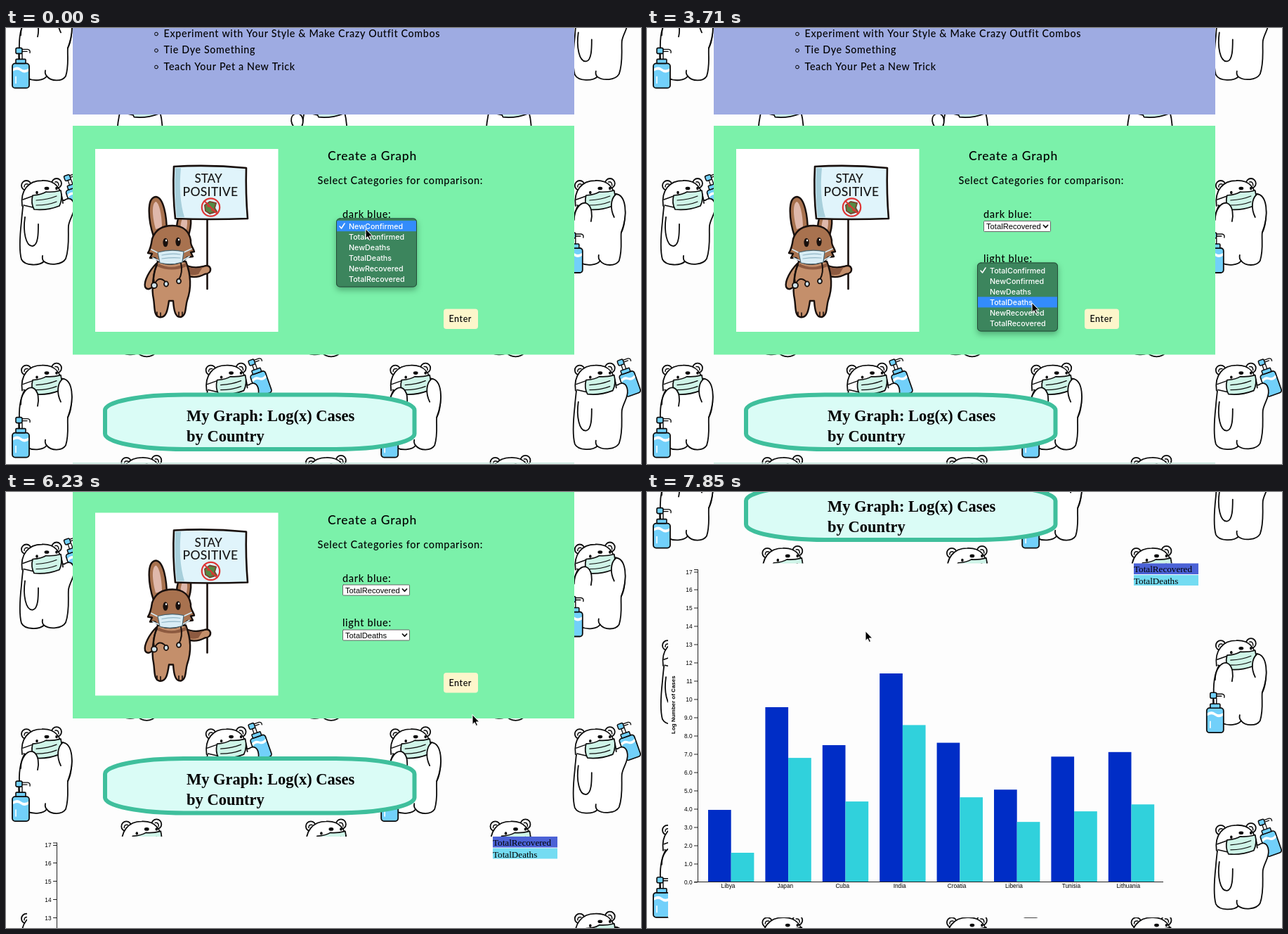
These frames come from a looping animation (904 by 620 pixels, 8 s). An HTML page with a canvas:

```html
<!DOCTYPE html>
<html lang="en">
<head>
<meta charset="utf-8">
<title>Create a Graph</title>
<style>
html, body { margin: 0; width: 100%; height: 100%; overflow: hidden; background: #fdfdfd; }
canvas { display: block; }
</style>
</head>
<body>
<canvas id="stage" width="904" height="620"></canvas>
<script>
const ctx = document.getElementById('stage').getContext('2d');
const LOOP = 8000, BEAT = 148;
const INK = '#0b0b0b', PAPER = '#fdfdfd';
const ROUND = 'Lato, sans-serif', ARIAL = '"Liberation Sans", Arial, sans-serif';

// Keys are in beats; values hold or run straight between them.
const CURSOR = [[0, 512, 286], [3, 516, 297], [5, 516, 297], [9, 536, 355], [11, 537, 356], [13, 533, 345],
  [17, 533, 345], [20, 560, 387], [21, 560, 387], [23, 548, 394], [24, 548, 394], [25, 548, 391],
  [29, 556, 393], [30, 556, 393], [34, 650, 415], [35, 650, 415], [39, 664, 317], [43, 664, 317],
  [45, 667, 306], [51, 667, 306], [52, 500, 252], [53, 311, 198]];
const SCROLL = [[40, 0], [41, 60], [42, 142.5], [43, 200], [44, 235], [45, 255.5], [46, 330],
  [47, 420], [48, 490], [49, 531]];

const OPTIONS = ['NewConfirmed', 'TotalConfirmed', 'NewDeaths', 'TotalDeaths', 'NewRecovered', 'TotalRecovered'];
const OPTIONS2 = ['TotalConfirmed', 'NewConfirmed', ...OPTIONS.slice(2)];
const BARS = [['Libya', 3.95, 1.6], ['Japan', 9.58, 6.8], ['Cuba', 7.5, 4.41], ['India', 11.43, 8.6],
  ['Croatia', 7.63, 4.64], ['Liberia', 5.06, 3.29], ['Tunisia', 6.87, 3.87], ['Lithuania', 7.12, 4.25]];

function track(keys, beat) {
  if (beat <= keys[0][0]) return keys[0].slice(1);
  for (let i = 1; i < keys.length; i++) {
    const a = keys[i - 1], b = keys[i];
    if (beat <= b[0]) {
      const u = (beat - a[0]) / (b[0] - a[0]);
      return a.slice(1).map((v, j) => v + (b[j + 1] - v) * u);
    }
  }
  return keys[keys.length - 1].slice(1);
}

function at(x, y, draw, angle = 0, scale = 1) {
  ctx.save();
  ctx.translate(x, y);
  ctx.rotate(angle);
  ctx.scale(scale, scale);
  draw();
  ctx.restore();
}

function rect(x, y, w, h, fill) {
  ctx.fillStyle = fill;
  ctx.fillRect(x, y, w, h);
}

function paint(shape, fill, stroke = INK, width = 1.8) {
  const p = typeof shape === 'string' ? new Path2D(shape) : shape;
  if (fill) { ctx.fillStyle = fill; ctx.fill(p); }
  if (stroke) { ctx.strokeStyle = stroke; ctx.lineWidth = width; ctx.stroke(p); }
}

function oval(x, y, rx, ry, fill, stroke = INK, width = 1.8) {
  const p = new Path2D();
  p.ellipse(x, y, rx, ry, 0, 0, Math.PI * 2);
  paint(p, fill, stroke, width);
}

function box(x, y, w, h, r, fill, stroke = null, width = 1) {
  const p = new Path2D();
  p.roundRect(x, y, w, h, r);
  paint(p, fill, stroke, width);
}

function text(str, x, y, font, color = '#000', align = 'left', spacing = 0) {
  ctx.font = font;
  ctx.letterSpacing = spacing + 'px';
  ctx.textAlign = align;
  ctx.fillStyle = color;
  ctx.fillText(str, x, y);
}

const label = (str, x, y, size) => text(str, x, y, `500 ${size}px ${ROUND}`, '#000', 'left', size * 0.045);

// ---- bears ----
function bottle() {
  box(-12, -16, 24, 35, 4, '#72d0fa', INK, 1.8);
  paint('M-11 -9Q-5 -13 0 -9T11 -9V-5Q5 -1 0 -5T-11 -5Z', '#fff', null);
  paint('M-7 3V12', null, '#fff', 1.6);
  box(-7, -22, 14, 6, 1, '#72d0fa', INK, 1.6);
  paint('M-3 -22V-30M2 -22V-30', null, INK, 1.4);
  box(-7, -38, 9, 8, 2, '#72d0fa', INK, 1.6);
  paint('M2 -36H10Q14 -35 13 -31M2 -33H9', null, INK, 1.4);
}

function bearHead() {
  oval(11, 11, 7, 7, '#fff');
  oval(54, 8, 7, 7, '#fff');
  paint('M8 13Q8 8 13 9M52 6Q57 5 57 11', null, INK, 1.5);
  paint('M5 40C2 18 14 4 33 4C52 3 61 14 63 36Z', '#fff', null);
  paint('M5 40C2 18 14 4 33 4C52 3 61 14 63 36', null);
  oval(26, 21, 1.8, 2.2, INK, null);
  oval(54, 15, 1.8, 2.2, INK, null);
  oval(40, 15, 3.4, 2.3, INK, null);
  paint('M20 26L6 31M20 42L7 39', null, INK, 1.5);
  paint('M20 25Q33 24 39 20Q48 21 60 18Q63 30 58 40Q40 47 22 45Q17 36 20 25Z', '#cff4e8', INK, 1.7);
  paint('M25 32Q42 31 54 26M25 39Q42 39 54 34', null, INK, 1.2);
}

function raisedBear() {
  at(82, 29, bottle, -0.34, 0.93);
  paint('M8 30C5 45 5 50 4 62C2 80 0 102 4 116C9 126 30 125 36 119C44 125 62 124 67 115' +
    'C73 98 70 80 71 68C73 57 80 50 79 40C78 30 72 27 65 32Z', '#fff');
  bearHead();
  paint('M9 56C6 76 10 98 20 97C28 96 28 78 28 66M36 119Q33 116 34 111', null);
}

function shyBear() {
  paint('M12 34C6 42 0 55 1 80C0 100 4 116 12 121C22 126 36 124 40 118C46 126 62 126 67 118' +
    'C72 102 69 88 70 78C77 66 80 28 63 23Z', '#fff');
  bearHead();
  paint('M3 60C3 45 12 34 20 36C29 40 29 54 27 62Z', '#fff', null);
  paint('M3 60C3 45 12 34 20 36C29 40 29 54 27 62', null);
  paint('M56 43C54 32 60 22 66 24C78 30 77 48 73 66C66 64 58 56 56 43Z', '#fff', null);
  paint('M62 23C77 24 80 52 70 78M62 24C55 30 54 44 60 56', null);
  paint('M40 118Q37 115 38 110', null);
  at(3, 116, bottle);
}

function plainBear(odd) {
  paint('M14 34C8 55 6 92 12 114C20 122 34 121 38 117C44 125 58 125 64 117C74 92 76 60 70 38Z', '#fff');
  at(11, 0, bearHead);
  if (odd) paint('M6 66C-8 58 -10 42 2 40C10 40 14 50 8 60', '#fff');
}

function wallpaper(scroll) {
  const size = 262.6;
  for (let j = -2; j < 5; j++) {
    const y = 213 + size * j;
    if (y + 290 < scroll || y - 30 > scroll + 620) continue;
    for (let k = -1; k < 4; k++) {
      const x = 18 + size * k;
      at(x, y, (k + j) % 2 ? shyBear : raisedBear);
      at(x + size / 2, y + size / 2, () => plainBear(k % 2));
    }
  }
}

// ---- picture ----
function bunny() {
  const fur = '#a8724f', belly = '#c48f6b', dark = '#8d5a40', pink = '#dfb8ab', line = '#19100d';
  rect(127, 172, 260.5, 260, '#fff');
  paint('M286.5 272V371', null, line, 2.6);
  paint('M210 296C203 275 199 241 213.5 240C224 241 229 266 229 292Z', fur, line, 2.4);
  paint('M213 286C208 268 207 249 213.5 247C219 250 222 270 222 284Z', pink, null);
  paint('M243 294C242 280 245 262 254 256C265 258 266 280 258 300Z', fur, line, 2.4);
  paint('M248 291C248 280 250 268 255 266C260 272 258 284 255 293Z', pink, null);

  paint('M214 335C204 345 196 360 198 368C201 374 208 371 213 362Z', belly, line, 2.4);
  paint('M254 336Q266 343 281 339Q289 336 291 342Q292 349 283 350Q270 357 256 352Z', belly, line, 2.4);
  paint('M258 339Q268 344 280 340L274 350Q264 353 258 349Z', dark, null);
  paint('M216 332C209 350 207 372 210 385C212 396 210 409 218 411C228 413 230 402 232 388H238' +
    'C239 402 241 412 249 411C257 409 255 397 258 387C264 370 263 350 256 332Z', belly, line, 2.4);
  paint('M217 335Q236 345 256 334L257 339Q236 348 215 339Z', dark, null);
  paint('M215 410V404M220 411V405M246 410V404M251 410V404', null, line, 1.6);
  paint('M215 337Q208 350 211 363M249 334Q252 348 246 358M212 363Q218 352 227 361', null, line, 2);
  oval(211, 366, 4, 4, '#cfe2ea', line, 1.8);
  oval(228, 364, 3, 3.6, '#cfe2ea', line, 1.8);
  oval(246, 360, 3, 3.4, '#cfe2ea', line, 1.8);

  paint('M208 300C213 285 225 281 237 281C253 281 261 290 263 302C262 309 267 313 268 318L263 319L266 325' +
    'L258 326C248 338 222 339 212 327L205 327L208 321L202 320C206 314 207 307 208 300Z', fur, line, 2.4);
  oval(227, 305, 3.6, 6.3, line, null);
  oval(245, 304, 3.6, 6.3, line, null);
  oval(228, 302, 1.1, 1.6, '#fff', null);
  oval(246, 301, 1.1, 1.6, '#fff', null);
  paint('M217 320L207 315M218 331L209 327M253 319L264 314M251 331L261 325', null, '#d5e9f2', 1.8);
  paint('M216 319Q235 314 253 318L251 333Q235 338 219 334Z', '#d9edf5', '#49636d', 1.2);
  paint('M222 323Q236 320 248 322M222 328Q236 326 248 327', null, '#92b6c6', 1.2);

  paint('M239 197Q290 194 342 199Q341 235 344 271Q290 273 241 271Q237 235 239 197Z', '#e0f4fb', line, 2.6);
  paint('M241 199H249Q245 240 254 269H243Q239 235 241 199Z', '#a7cfdb', null);
  text('STAY', 288, 220, `500 17px ${ROUND}`, '#171717', 'center');
  text('POSITIVE', 291, 238.5, `500 17.5px ${ROUND}`, '#171717', 'center', 0.3);
  paint('M283 252L290 247L299 249L297 256L300 261L290 264L284 260Z', '#548b45', '#77482d', 2);
  oval(288, 253, 2, 2, '#b34d35', null);
  oval(294, 259, 2, 2, '#b34d35', null);
  oval(291.5, 255, 12.7, 12.7, null, '#df3434', 2.2);
  paint('M282.5 246L300.5 264', null, '#df3434', 2);
}

// ---- form ----
function select(x, y, value) {
  box(x + 0.5, y + 0.5, 95, 15, 1, '#fff', '#666');
  text(value, x + 4, y + 12, `11.2px ${ARIAL}`);
  paint(`M${x + 85.5} ${y + 6.5}l3 3.2l3 -3.2`, null, '#111', 1.8);
}

function menu(x, y, items, hover, alpha) {
  const row = 15.1, top = y + 3.5;
  ctx.save();
  ctx.globalAlpha = alpha;
  ctx.shadowColor = 'rgba(0,40,20,.35)';
  ctx.shadowBlur = 9;
  ctx.shadowOffsetY = 4;
  box(x, y, 115, 98, 5, '#3c855d');
  ctx.shadowColor = 'transparent';
  rect(x + 0.5, top + hover * row, 114, row, '#338cfb');
  box(x + 0.5, y + 0.5, 114, 97, 5, null, '#254c38');
  items.forEach((s, i) => text(s, x + 18, top + 11.5 + i * row, '500 10.7px Inter, sans-serif', '#fff'));
  paint(`M${x + 5} ${top + 8}l2.5 3l4.5 -7`, null, '#fff', 1.5);
  ctx.restore();
}

function page(beat) {
  rect(95, -10, 714, 133, '#9eabe2');
  ['Experiment with Your Style & Make Crazy Outfit Combos', 'Tie Dye Something', 'Teach Your Pet a New Trick']
    .forEach((s, i) => {
      const y = 12.5 + i * 23.5;
      oval(214, y - 4, 2.4, 2.4, null, '#000', 1);
      label(s, 224.5, y, 14.3);
    });

  rect(95, 139, 714, 325.5, '#7bf1aa');
  bunny();
  label('Create a Graph', 458, 188, 17.5);
  label('Select Categories for comparison:', 443.5, 222, 14.5);
  label('dark blue:', 479, 270, 14.5);
  label('light blue:', 479, 333, 14.5);
  select(479, 274, beat < 14 ? 'NewConfirmed' : 'TotalRecovered');
  select(479, 338, beat < 28 ? 'TotalConfirmed' : 'TotalDeaths');
  box(623, 399.5, 49, 28.5, 4, '#fdf6cb');
  label('Enter', 630.5, 418, 12.5);

  const pill = new Path2D();
  pill.roundRect(141, 521.5, 440.5, 77.5, { x: 112, y: 22 });
  paint(pill, '#dafcf6', '#3fbf9c', 6);
  const title = 'bold 22.5px "Liberation Serif", Times, serif';
  text('My Graph: Log(x) Cases', 257, 558.5, title);
  text('by Country', 257, 587.5, title);
}

// ---- chart ----
function chart() {
  const base = 1085.5, unit = 25.94, font = `8.3px ${ARIAL}`;
  rect(30, 632.5, 765, 503.5, PAPER);
  BARS.forEach(([name, dark, light], i) => {
    const x = 87 + i * 81.4;
    rect(x, base - dark * unit, 32.7, dark * unit, '#002dc6');
    rect(x + 32.7, base - light * unit, 32.7, light * unit, '#30d1dc');
    text(name, x + 28.5, base + 8.5, font, '#000', 'center');
  });
  for (let v = 0; v <= 17; v++) {
    const y = base - v * unit;
    rect(67, Math.round(y) - 0.5, 5, 1, '#222');
    text(v < 10 ? v.toFixed(1) : String(v), 64.5, y + 3, font, '#000', 'right');
  }
  rect(67, 641, 5.5, 1, '#222');
  rect(72, 641, 1, base - 641, '#222');
  rect(67, base - 0.5, 668, 1, '#222');
  at(40, 875, () => text('Log Number of Cases', 0, 0, `bold 8px ${ARIAL}`), -Math.PI / 2);

  const key = '13.15px "Liberation Serif", Times, serif';
  rect(693, 632.5, 92, 15.5, '#4b62d6');
  rect(693, 649, 92, 15, '#74dcf2');
  text('TotalRecovered', 693, 645, key);
  text('TotalDeaths', 693, 662, key);
}

function draw(now) {
  const beat = Math.floor((now % LOOP) / BEAT);
  const [scroll] = track(SCROLL, beat);
  const [x, y] = track(CURSOR, beat);
  const row = top => Math.max(0, Math.min(5, Math.floor((y - top) / 15.1)));

  rect(0, 0, 904, 620, PAPER);
  ctx.lineCap = ctx.lineJoin = 'round';
  at(0, -scroll, () => {
    wallpaper(scroll);
    if (beat < 38) rect(95, 618, 714, 1.5, '#c4e8dc');
    else chart();
    page(beat);
    if (beat < 13) menu(470, 270.5, OPTIONS, row(274), beat < 12 ? 1 : 0.4);
    if (beat >= 15 && beat < 28) menu(470, 333.5, OPTIONS2, row(337), beat < 27 ? 1 : 0.4);
  });
  at(x, y, () => paint('M0 0V13.5L3.1 10.7L5.3 15.5L7.5 14.5L5.3 9.9H9.6Z', '#000', '#fff', 1));
  requestAnimationFrame(draw);
}
requestAnimationFrame(draw);
</script>
</body>
</html>
```
